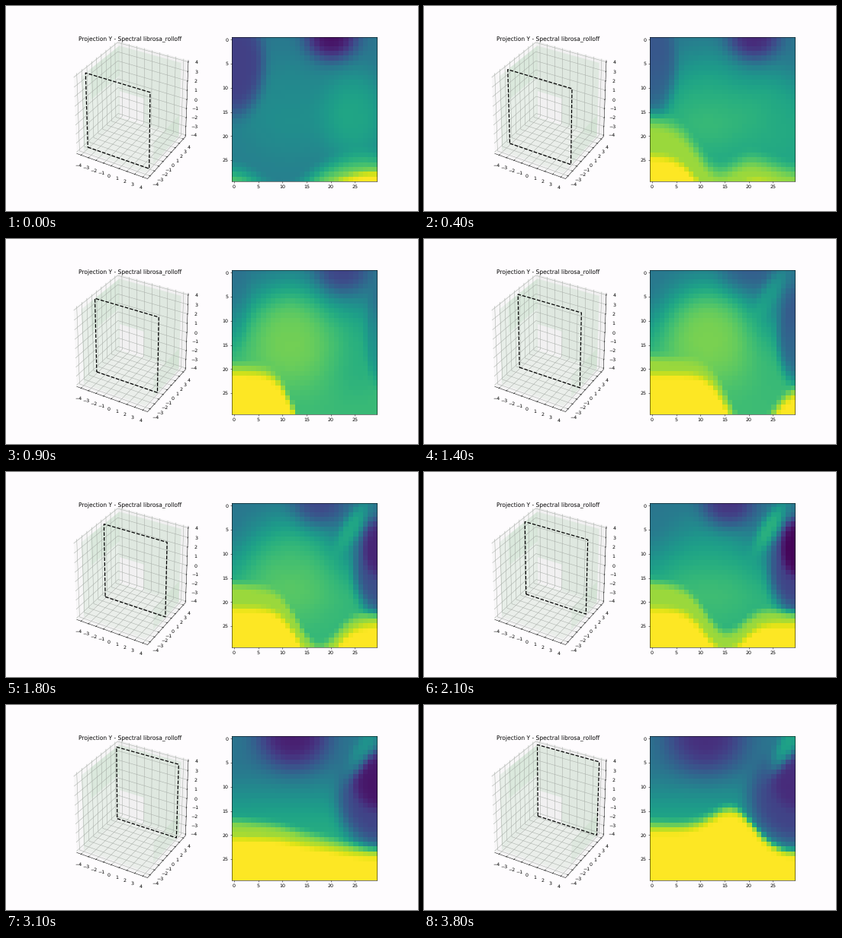
Write a matplotlib script that moves like this. It is 540 by 270 pixels and loops after 3.9 s.

```python
import numpy as np
import matplotlib.pyplot as plt
from matplotlib.animation import FuncAnimation

W, H, DPI = 540, 270, 45
FRAMES = 39
SIZE = 30
PAPER = "#fefcfe"

plt.rcParams["font.family"] = "DejaVu Sans"
plt.rcParams["text.hinting"] = "none"

fig = plt.figure(figsize=(W / DPI, H / DPI), dpi=DPI, facecolor=PAPER)

# ---------- 3D view: unit cube centred on the origin ----------
ELEV, AZIM, DIST = np.radians(30), np.radians(-60), 10
EYE = np.array([np.cos(ELEV) * np.cos(AZIM),
                np.cos(ELEV) * np.sin(AZIM), np.sin(ELEV)])
RIGHT = np.array([-np.sin(AZIM), np.cos(AZIM), 0])
UP = np.cross(EYE, RIGHT)
BOX = (67.5, 240.3, 190.2, 207.9)   # left, bottom, width, height in pixels
E = 25 / 48                         # cube edge including its margin
R = 4 / 8.8                         # data edge along x and y


def project(points):
    p = np.asarray(points, float)
    depth = DIST - p @ EYE
    px = (p @ RIGHT / depth + 0.095) / 0.185
    py = (p @ UP / depth + 0.095) / 0.185
    return BOX[0] + BOX[2] * px, BOX[1] - BOX[3] * py


view = fig.add_axes([0, 0, 1, 1])
view.set_xlim(0, W)
view.set_ylim(H, 0)
view.axis("off")


def face(points, color, alpha):
    view.fill(*project(points), color=color, alpha=alpha, lw=0)


def line(points, color="black"):
    view.plot(*project(points), color=color, lw=0.8)


def across(x0, x1, z0, z1, y=E):
    return [(x0, y, z0), (x1, y, z0), (x1, y, z1), (x0, y, z1)]


def along(y0, y1, z0, z1, x=-E):
    return [(x, y0, z0), (x, y1, z0), (x, y1, z1), (x, y0, z1)]


def flat(x0, x1, y0, y1, z=-E):
    return [(x0, y0, z), (x1, y0, z), (x1, y1, z), (x0, y1, z)]


face(along(-E, E, -E, E), "0.95", 0.5)
face(across(-E, E, -E, E), "0.90", 0.5)
face(flat(-E, E, -E, E), "0.925", 0.5)

for n in range(-4, 5):
    t, tz = n / 8.8, n / 8
    for path in ([(t, E, E), (t, E, -E), (t, -E, -E)],
                 [(-E, t, E), (-E, t, -E), (E, t, -E)],
                 [(E, E, tz), (-E, E, tz), (-E, -E, tz)]):
        line(path, "#a6aca6")

# faint green volume seen against the walls
GREEN = "#4aa352"
face(across(-R, R, -0.125, 0.5, R), GREEN, 0.10)
face(across(-0.08, R, -0.5, -0.125, R), GREEN, 0.10)
face(along(-R, R, -0.5, 0.5, -R), GREEN, 0.09)
face(flat(-R, R, -R, R, -0.5), GREEN, 0.06)
face(along(-0.25, R, 0.1, 0.5, -R), GREEN, 0.08)
face(along(-0.25, R, -0.5, -0.2, R), GREEN, 0.07)

line([(-E, -E, -E), (E, -E, -E), (E, E, -E), (E, E, E)])


def tick(inner, outer, at, text, dx, dy):
    line([inner, outer])
    x, y = project(at)
    view.text(x + dx, y + dy, text, size=10, ha="center", va="center")


IN, OUT = E - 0.0167, E + 0.0083
for n in range(-4, 5):
    t, tz = n / 8.8, n / 8
    text = str(n).replace("-", "\u2212")
    tick((t, -IN, -E), (t, -OUT, -E), (t, -E, -E), text, -3, 13.5)
    tick((IN, t, -E), (OUT, t, -E), (E, t, -E), text, 7.5, 11.5)
    tick((E, IN, tz), (E, OUT, tz), (E, E, tz), text, 11, 0.8)

view.text(162.6, 43, "Projection Y - Spectral librosa_rolloff",
          size=12, ha="center", va="center")
outline, = view.plot([], [], "--", color="black", lw=2)

# ---------- Heat map: soft regions painted over each other ----------
Y, X = np.mgrid[0:SIZE, 0:SIZE].astype(float)


def ramp(v, start, end):
    s = np.clip((v - start) / (end - start), 0, 1)
    return s * s * (3 - 2 * s)


def blob(x, y, rx, ry, power=1.5, tilt=0):
    """Round region with a weight of 1 in the middle; power sharpens its rim."""
    dx = (X - x + tilt * (Y - y)) / rx
    return np.exp(-(dx ** 2 + ((Y - y) / ry) ** 2) ** power)


def paint(field, value, weight):
    return field + (value - field) * weight


def floor_line(i):
    """Row where the bright floor starts, with one travelling dip or crest."""
    left = np.interp(i, [0, 4, 9, 26, 38], [34, 24.5, 21.2, 22, 19.5])
    right = np.interp(i, [0, 9, 14, 38], [28, 34, 25, 24.5])
    depth = np.interp(i, [0, 9, 14, 26, 38], [4, 12, 12, 5, -5.5])
    centre = np.interp(i, [0, 14, 26, 38], [10, 20, 11, 17])
    slope = left + (right - left) * ramp(X, 8, 29)
    return slope + depth * np.exp(-((X - centre) / 5.7) ** 2)


def heat(i):
    warmth = np.exp(-((i - 12) / 6.5) ** 2 / 2)
    lift = np.interp(i, [0, 6], [0.03, 0.22])
    field = 0.39 + lift * ramp(Y, 4, 20) + 0.08 * warmth * ramp(Y, 8, 24)

    # right hump early on, broad green hill in the middle of the loop
    field = paint(field, 0.62, blob(25, 16, 7, 10)
                  * np.interp(i, [0, 9, 16], [0.8, 0.8, 0]))
    field = paint(field, 0.81, blob(11.5, 13, 10.5, 11) * warmth)

    # dark areas: left edge, top edge, right edge with its core
    fade = np.interp(i, [0, 10], [1, 0])
    field = paint(field, 0.19, blob(0, 5, 3 + 3.3 * fade, 11, 3) * fade)
    grow = ramp(i, 18, 38)
    field = paint(field, 0.05,
                  blob(np.interp(i, [0, 9, 26, 38], [20, 22, 13, 11]), -0.5,
                       5.5 + 3 * grow, 5 + 3 * grow)
                  * np.interp(i, [0, 14, 26, 38], [1, 0.3, 1, 0.75]))
    field = paint(field, 0.2,
                  blob(30, 13, np.interp(i, [9, 26, 38], [3, 7.5, 10.5]), 10, 3)
                  * np.interp(i, [6, 16, 21], [0, 0.85, 1]))
    field = paint(field, 0.01,
                  blob(30, 9, 3.5 + 2 * ramp(i, 20, 27), 6, 3)
                  * np.interp(i, [14, 21, 26, 38], [0, 1, 1, 0.4]))

    # slanted bright streak at the upper right
    drift = ramp(i, 21, 38)
    field = paint(field, 0.66,
                  blob(24 + 4 * drift, 5 - 4 * drift, 2.2, 5.5, 1.5, 0.5)
                  * np.interp(i, [9, 15, 21, 26, 38], [0, 0.6, 0.9, 0.3, 0.7]))

    # green shelf, then the floor itself
    edge = floor_line(i)
    gap = np.interp(i, [0, 4, 9, 20, 26, 38], [6, 8, 2, 6, 5, 2])
    shelf = edge - gap * (1 - 0.6 * X / SIZE)
    soft = np.interp(i, [0, 9], [4, 1.5])
    field = paint(field, 0.85, ramp(Y, shelf - soft, shelf + soft))
    return paint(field, 1, ramp(Y, edge - 1.5, edge + 1))


ax = fig.add_subplot(122)
image = ax.imshow(heat(0), cmap="viridis", vmin=0, vmax=1)
ax.set_xticks(range(0, SIZE, 5))
ax.set_yticks(range(0, SIZE, 5))


def update(i):
    y = min(4, -4 + (i + 4) * 8 / 38) / 8.8
    corners = across(-R, R, -0.5, 0.5, y)
    outline.set_data(*project(corners + corners[:1]))
    image.set_data(heat(i))
    return outline, image


anim = FuncAnimation(fig, update, frames=FRAMES, interval=100, repeat=True)
plt.show()
```
